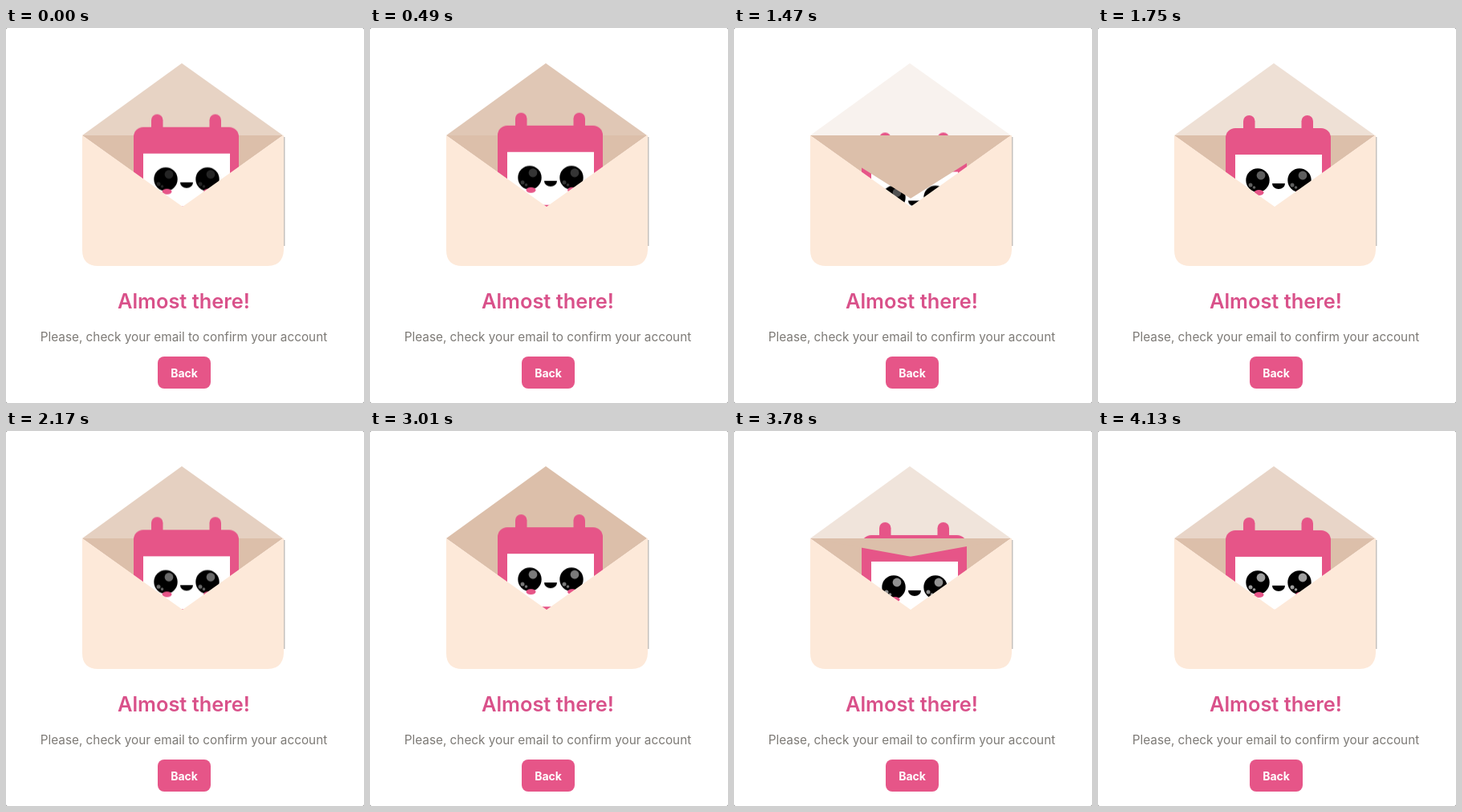
Recreate the animation shown at these times as an HTML page. Size 446 px wide and 468 px high, loop 4.2 s.

```html
<!DOCTYPE html>
<html lang="en">
<head>
<meta charset="utf-8">
<title>Almost there!</title>
<style>
  html, body { margin: 0; width: 100%; height: 100%; overflow: hidden; background: #777; }
  svg { display: block; width: 446px; height: 468px; }
  text { font-family: Inter, "Open Sans", sans-serif; text-anchor: middle; }
  .title { font-size: 25.4px; font-weight: 600; fill: #d9518a; }
  .note { font-size: 15.3px; fill: #7d7a76; }
  .label { font-size: 14px; font-weight: 700; fill: #fff; }
  .pink { fill: #e65588; }
  .tan { fill: #dcbfaa; }

  /* One shared cycle: it ends open and snaps back to closed. */
  .back, .flap, .card, .shine { animation: 2100ms linear -1155ms infinite; }
  .back { animation-name: appear; }
  .flap { animation-name: lift; transform-origin: 0 134px; }
  .card { animation-name: rise; }
  .shine { animation-name: twinkle; fill: #fff; }

  @keyframes appear {
    0%, 16% { opacity: 0; }
    38% { opacity: .48; }
    58% { opacity: .72; }
    96%, 100% { opacity: 1; }
  }
  @keyframes lift {
    0% { transform: scaleY(1); }
    20% { transform: scaleY(1); animation-timing-function: ease-in; }
    38%, 100% { transform: scaleY(0); }
  }
  @keyframes rise {
    0% { transform: translateY(68px); }
    38% { transform: translateY(5px); }
    100% { transform: translateY(0); }
  }
  @keyframes twinkle {
    0%, 100% { opacity: 1; }
    50% { opacity: 0; }
  }
</style>
</head>
<body>
<svg viewBox="0 0 446 468">
  <defs>
    <linearGradient id="shade">
      <stop offset="0" stop-color="#aaa39d"/>
      <stop offset="1" stop-color="#fff"/>
    </linearGradient>
    <g id="eye">
      <circle r="14.7"/>
      <g class="shine">
        <circle cx="4" cy="-6" r="5.4"/>
        <circle cx="-9" cy="6" r="2.5"/>
        <circle cx="-4.5" cy="9" r="1.8"/>
      </g>
    </g>
  </defs>

  <rect width="446" height="468" rx="2" fill="#fff"/>

  <!-- envelope inside and raised flap -->
  <path class="back tan" d="M95 134L219 44L345 134Z"/>
  <path class="tan" d="M95 134H345L220 224Z"/>

  <!-- calendar -->
  <g class="card">
    <g class="pink">
      <rect x="181" y="104" width="14.5" height="30" rx="7.2"/>
      <rect x="253.5" y="104" width="14.5" height="30" rx="7.2"/>
      <rect x="159" y="120" width="131" height="105" rx="12"/>
    </g>
    <rect x="171" y="153" width="108" height="66" fill="#fff"/>
    <use href="#eye" x="199" y="185"/>
    <use href="#eye" x="251" y="185"/>
    <path d="M217 189H233A8 7 0 0 1 217 189Z"/>
    <g class="pink">
      <ellipse cx="200.5" cy="200.5" rx="6" ry="3.5"/>
      <ellipse cx="252" cy="200.5" rx="6" ry="3.5"/>
    </g>
  </g>

  <path class="flap tan" d="M95 134H345L220 223Z"/>

  <!-- envelope front -->
  <rect x="345.5" y="136" width="3" height="136" fill="url(#shade)"/>
  <path fill="#fde9d9" d="M95 134L220 223L345 134H346V270Q348 297 326 297H115Q95 297 95 277Z"/>

  <text class="title" x="221.5" y="350">Almost there!</text>
  <text class="note" x="221.5" y="390.5">Please, check your email to confirm your account</text>
  <rect class="pink" x="189" y="410" width="66" height="40" rx="8"/>
  <text class="label" x="222" y="435.5">Back</text>
</svg>
</body>
</html>
```
